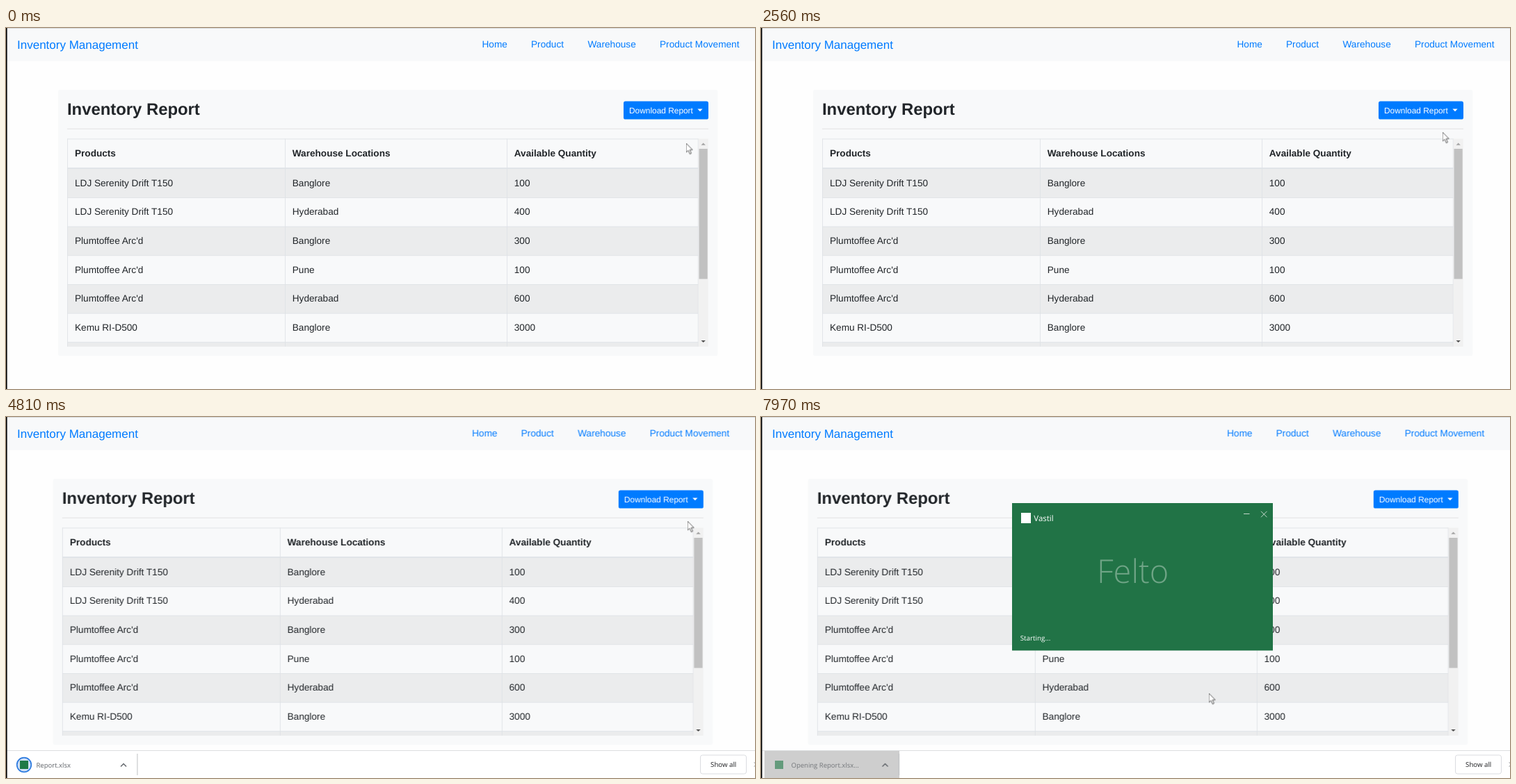
Animation of 1077 by 520 pixels, one loop 8 s. Source, as an HTML page:

```html
<!DOCTYPE html>
<html lang="en">
<head>
<meta charset="utf-8">
<title>Inventory Report</title>
<style>
html, body { margin: 0; width: 100%; height: 100%; overflow: hidden; background: #fefefe; }
svg { display: block; width: 1077px; height: 520px; }
text { font-family: "Liberation Sans", Arial, sans-serif; white-space: pre; text-rendering: geometricPrecision; }
.ui text { font-family: "Open Sans", "Noto Sans", sans-serif; }
.b { font-weight: 700; }
.semi { font-weight: 500; }
.thin { font-weight: 350; }
.e { text-anchor: end; }
.m { text-anchor: middle; }

/* one cycle is 8 s: 1% = 80 ms */
.a { animation: 8s linear infinite; }
.hard { animation-timing-function: step-end; }

#pointer { animation-name: pointer; animation-timing-function: ease-in-out; }
@keyframes pointer {
  0%, .4% { transform: translate(977.5px, 165.5px); }
  3%, 11.9% { transform: translate(924px, 115px); }
  18.4%, 29.9% { transform: translate(979px, 149px); }
  30%, 66.2% { transform: translate(979.5px, 149.5px); }
  76.5% { transform: translate(185px, 425px); animation-timing-function: ease-out; }
  80.8%, 90.4% { transform: translate(132px, 492.5px); }
  97%, 100% { transform: translate(643.5px, 397.5px); }
}
#arrow { animation-name: arrow; }
@keyframes arrow { 0% { opacity: 1; } 2% { opacity: 0; } 30% { opacity: 1; } }
#hand { animation-name: hand; }
@keyframes hand { 0% { opacity: 0; } 2% { opacity: 1; } 30% { opacity: 0; } }
#click { animation-name: click; }
@keyframes click {
  0%, 6.4% { opacity: 0; } 7.4% { opacity: .7; } 9.8%, 22.8% { opacity: 0; }
  23.1% { opacity: .6; } 24.2% { opacity: .7; } 28.2%, 85% { opacity: 0; }
  86.2% { opacity: .7; } 88.4%, 100% { opacity: 0; }
}

#btn { animation-name: btn; }
@keyframes btn { 0% { fill: #007bff; } 2% { fill: #0069d9; } 6.6% { fill: #0062cc; } 27% { fill: #007bff; } }
.open { animation-name: open; }
@keyframes open { 0% { opacity: 0; } 7.5% { opacity: 1; } 27% { opacity: 0; } }
#pick { animation-name: pick; }
@keyframes pick { 0% { opacity: 0; } 22.8% { opacity: 1; } 27% { opacity: 0; } }
#status { animation-name: status; }
@keyframes status { 0%, 20% { opacity: 0; } 21.2%, 30% { opacity: 1; } 32%, 100% { opacity: 0; } }

#dialog { animation-name: dialog; transform-origin: 531px 224px; }
@keyframes dialog {
  0%, 33.8% { opacity: 0; transform: scale(.95); }
  36.1% { opacity: .96; transform: none; }
  38.8%, 49.1% { opacity: 1; transform: none; }
  51.3% { opacity: .06; transform: scale(.958); }
  52.6%, 100% { opacity: 0; transform: scale(.95); }
}
#late { animation-name: late; }
@keyframes late { 0% { opacity: 0; } 37.5% { opacity: 1; } }
#caret { animation-name: caret; }
@keyframes caret { 0% { opacity: 0; } 42.6% { opacity: 1; } }

#links { animation-name: links; }
@keyframes links { 0% { transform: none; } 54.5% { transform: translateX(-14.4px); } }
#card { animation-name: card; }
@keyframes card { 0% { transform: none; } 54.5% { transform: translateX(-7.2px); } }

#shelf { animation-name: shelf; }
@keyframes shelf { 0%, 54% { transform: translateY(41px); } 59.2%, 100% { transform: none; } }
#edge { animation-name: edge; }
@keyframes edge { 0%, 62% { transform: none; } 64.8%, 100% { transform: translateX(9.5px); } }
#hover { animation-name: hover; }
@keyframes hover { 0%, 80.5% { opacity: 0; } 82%, 100% { opacity: 1; } }
#ripple { animation-name: ripple; transform-origin: 131.5px 493px; }
@keyframes ripple { 0%, 84.5% { transform: scale(0); } 86.25% { transform: scale(1); } 89%, 100% { transform: scale(2.8); } }
#done { animation-name: done; }
@keyframes done { 0% { opacity: 1; } 88.1% { opacity: 0; } }
#opening { animation-name: opening; }
@keyframes opening { 0% { opacity: 0; } 88.1% { opacity: 1; } }
#pulse { animation: pulse .5s ease-in-out infinite; }
@keyframes pulse { 0%, 100% { opacity: .45; } 60% { opacity: 1; } }
#splash { animation-name: splash; }
@keyframes splash { 0%, 95.4% { opacity: 0; } 97%, 100% { opacity: 1; } }
</style>
</head>
<body>
<svg id="stage" viewBox="0 0 1077 520"></svg>
<script>
const UI = 9.85, BODY = 13.6;
const rect = (x, y, w, h, fill, more = '') =>
  `<rect x="${x}" y="${y}" width="${w}" height="${h}" fill="${fill}" ${more}/>`;
// cy is the visual middle of the capitals
const text = (x, cy, str, size = BODY, fill = '#212529', cls = '') =>
  `<text x="${x}" y="${cy + size * .355}" font-size="${size}" fill="${fill}" class="${cls}">${str}</text>`;
const line = (d, stroke, w = 1) => `<path d="${d}" fill="none" stroke="${stroke}" stroke-width="${w}"/>`;
const fill = (d, color) => `<path d="${d}" fill="${color}"/>`;
const dot = (x, y, r, color) => `<circle cx="${x}" cy="${y}" r="${r}" fill="${color}"/>`;
const group = (id, body, cls = 'a') => `<g id="${id}" class="${cls}">${body}</g>`;
const caretDown = (x, y, r, color) => fill(`M${x - r} ${y - r / 2}h${2 * r}l${-r} ${r}z`, color);
const chevron = (x, y, r, dir, color, w = 1.2) =>
  line(`M${x - r} ${y - dir * r / 2}l${r} ${dir * r}l${r} ${-dir * r}`, color, w);
const sum = (list, fn) => list.map(fn).join('');

function navBar() {
  const links = [[684.5, 'Home'], [755, 'Product'], [836.5, 'Warehouse'], [940, 'Product Movement']];
  return rect(0, 0, 1077, 47.6, '#f8f9fa') +
    text(16, 23.9, 'Inventory Management', 17, '#007bff') +
    group('links', sum(links, ([x, s]) => text(x, 23.6, s, 13.65, '#007bff')), 'a hard');
}

function table() {
  const cols = [99, 411.8, 730.8], top = 202.8, step = 41.65;
  const glide = 'LDJ Serenity Drift T150', buds = "Plumtoffee Arc'd";
  const rows = [
    [glide, 'Banglore', 100], [glide, 'Hyderabad', 400],
    [buds, 'Banglore', 300], [buds, 'Pune', 100], [buds, 'Hyderabad', 600],
    ['Kemu RI-D500', 'Banglore', 3000], ['', '', '']
  ];
  let s = sum(['Products', 'Warehouse Locations', 'Available Quantity'],
    (h, i) => text(cols[i], 180.5, h, BODY, '#212529', 'b'));
  rows.forEach((row, i) => {
    const y = top + i * step;
    if (i % 2 === 0) s += rect(88, y, 907.5, step, '#ebeced');
    if (i) s += rect(88, y - .4, 907.5, .85, '#dee2e6');
    s += sum(row, (v, c) => text(cols[c], y + 20.2, v));
  });
  s += rect(88, 159.5, 907.5, .85, '#dee2e6') + rect(88, 201.2, 907.5, 1.7, '#dee2e6');
  s += sum([88, 401, 720.2, 994.8], x => rect(x, 159.5, .85, 300, '#dee2e6'));
  s += rect(995.7, 159.5, 14, 300, '#f1f1f1') + rect(996.5, 174, 12.2, 187.5, '#c1c1c1') +
    fill('M999.5 168.8h6.4l-3.2-3.3z', '#a3a3a3') + caretDown(1002.7, 451.5, 3.2, '#505050');
  return `<g clip-path="url(#tableClip)">${s}</g>`;
}

function card() {
  const menu = rect(888.5, 134.5, 135.3, 59, '#fff', 'rx="3" stroke="#c8c9ca" stroke-width=".9"') +
    text(909, 152.6, 'Felto') + text(909, 175.4, 'Pdf') +
    group('pick', rect(889, 141, 134.4, 23, '#007bff') + text(909, 152.6, 'Felto', BODY, '#fff'), 'a hard');
  return group('card',
    rect(74.8, 89, 948.6, 383.3, '#f8f9fa', 'rx="3.4"') +
    text(88, 116.7, 'Inventory Report', 23.85, '#212529', 'b') +
    rect(88, 144.8, 922, .9, '#dfe0e2') + table() +
    `<g class="a hard open">${rect(885.3, 102.9, 127.3, 31.4, '#92c4fc', 'rx="5"')}</g>` +
    rect(888, 105.6, 122, 26, '#007bff', 'id="btn" class="a hard" rx="2.7"') +
    text(896, 118.7, 'Download Report', 11.9, '#fff') + caretDown(998, 118.4, 3.6, '#fff') +
    `<g class="a hard open">${menu}</g>`, 'a hard');
}

function status() {
  return group('status', rect(2, 503, 109, 18, '#dcdee1', 'rx="2"') +
    text(6, 512.3, '127.0.0.1:5000/Report', 9.6, '#53575c'), 'a ui');
}

function shelf() {
  const icon = rect(20, 495, 12, 12, '#1f7a46');
  return group('shelf',
    rect(1.6, 480, 1076, 41, '#fff') + rect(1.6, 480, 1076, 1, '#dcdee0') +
    group('hover', rect(5, 481, 193, 39, '#f0f0f0')) +
    `<g clip-path="url(#chipClip)"><circle id="ripple" class="a" cx="131.5" cy="493" r="54.5" fill="#cecece"/></g>` +
    group('done',
      `<g id="pulse"><circle cx="26" cy="501" r="10.3" fill="#cfe0f6" stroke="#2d7be0" stroke-width="1.7"/></g>` +
      icon + text(43.5, 502, 'Report.xlsx', 9.5, '#5f6368'), 'a hard') +
    group('opening', `<g opacity=".6">${icon}</g>` +
      text(43.5, 502, 'Opening Report.xlsx...', 9.5, '#74777b'), 'a hard') +
    group('edge', chevron(169, 501.5, 4, -1, '#5f6368', 1.4) + rect(188.4, 485, 1, 31, '#bfc1c4')) +
    rect(998.5, 487, 66, 27, '#fff', 'rx="3" stroke="#dadce0"') +
    text(1031.7, 500.3, 'Show all', 9.7, '#202124', 'm semi') +
    line('M1076 497.5l6 6m-6 0l6-6', '#5f6368'), 'a ui');
}

const folder = (x, y) => fill(`M${x} ${y - 5}h4l1 1.5h4v9h-9z`, '#f0c44f') + rect(x + 2, y - 3, 7, 8, '#fbdd86');
const icons = {
  folder: y => folder(38, y),
  down: y => fill(`M40.5 ${y - 5}h4v5h3l-5 5.5l-5-5.5h3z`, '#3a84cf'),
  doc: y => rect(38, y - 5.5, 9, 11, '#fff', 'stroke="#8a97a5"') + rect(40, y - 1, 5, 4, '#6fa5d2'),
  pic: y => rect(37, y - 4.5, 12, 9, '#d9eaf7', 'stroke="#8795a3" stroke-width=".8"') +
    fill(`M38 ${y + 4}v-3l4-2l6 3v2z`, '#3f78a8'),
  cube: y => fill(`M37 ${y - 4}l7-1.5l5 2v7l-5 2l-7-2z`, '#29a3d8') + fill(`M40 ${y - 2}h5v5h-5z`, '#bfeaf8'),
  screen: y => rect(36.5, y - 4.5, 12.5, 9, '#1e8fe6', 'stroke="#1468ad" stroke-width=".8"'),
  page: y => rect(38, y - 6, 9, 12, '#fff', 'stroke="#9a9a9a"'),
  round: y => dot(36, y, 5, '#0f6cc9'),
  pc: y => fill(`M31 ${y - 5}l9 2v6l-9-1.5z`, '#3d95d6') + rect(33, y + 3, 10, 1.8, '#8796a3'),
  net: y => fill(`M31 ${y - 3}l10-2v7l-10 1z`, '#3d95d6') + dot(34, y + 2, 3.5, '#4a78a8')
};

function sidebar() {
  const items = [
    [33, 'Downloads', 'down', 1], [53.5, 'Documents', 'doc', 1], [74, 'Pictures', 'pic', 1],
    [94.5, 'Docs', 'folder'], [115, 'Inventory-Management', 'folder'], [135.5, 'Setup files', 'folder'],
    [156, 'src', 'folder'], [183.5, 'FogCrate', 'round'], [210.7, 'This PC', 'pc'],
    [231.2, '3D Objects', 'cube'], [251.7, 'Desktop', 'screen'], [272.2, 'Documents', 'doc'],
    [292.7, 'Downloads', 'down'], [313.2, 'Music', ''], [333.7, 'Pictures', 'pic'],
    [354.2, 'Videos', ''], [374.7, 'OS (C:)', 'page'], [402, 'Network', 'net']
  ];
  const outer = ['round', 'pc', 'net'];
  const rows = sum(items, ([y, name, icon, pin]) =>
    (icon ? icons[icon](y) : '') + text(outer.includes(icon) ? 45.3 : 52.4, y, name, UI, '#111') +
    (pin ? fill(`M119 ${y - 4}l5 4l-2 .5l-2 3l-1.5-1.5l-2.5 2.5l2-3.5l-1.5-1.5l3-1.5z`, '#8b9298') : ''));
  const late = line('M41 317v-8l5 2v2', '#2f8fdc', 1.4) + dot(40, 317, 2, '#2f8fdc') +
    rect(37, 349.5, 11, 9, '#4d5660') + rect(39, 351.5, 7, 5, '#9fc3dd');
  return `<g clip-path="url(#sideClip)">${rect(9, 241.5, 119, 20.5, '#d9d9d9')}${rows}${group('late', late, 'a hard')}</g>` +
    rect(127.5, 23, 14, 384, '#f0f0f0') + rect(127.5, 76, 14, 305, '#cdcdcd') +
    chevron(134.5, 31, 3.3, -1, '#444', 1.5) + chevron(134.5, 400, 3.3, 1, '#444', 1.5);
}

function fileList() {
  const heads = [[160, 'Name'], [411.5, 'Date modified'], [549.5, 'Type'], [665, 'Size']];
  const files = [['__pycache__', '21/08/2020 16:13'], ['static', '09/08/2020 00:38'],
    ['templates', '21/08/2020 20:44'], ['utils', '21/08/2020 17:32']];
  return sum(heads, ([x, s]) => text(x, 35, s, UI, '#50596a')) +
    sum([406, 544, 659.5, 736], x => rect(x, 23, 1, 23, '#e5e5e5')) +
    chevron(280.5, 24.5, 3.3, -1, '#777', 1) +
    sum(files, ([name, date], i) => {
      const y = 61 + i * 18.2;
      return folder(162.5, y - .5) + text(177.5, y, name, UI, '#111') +
        text(411.5, y, date, UI, '#6d6d6d') + text(549.5, y, 'File folder', UI, '#6d6d6d');
    });
}

function dialog() {
  const button = (x, s, stroke, w) =>
    rect(x, 483, 74, 20, '#e1e1e1', `stroke="${stroke}" stroke-width="${w}"`) + text(x + 37, 493.7, s, UI, '#111', 'm');
  return group('dialog',
    rect(8.5, -12, 1022, 527, '#fff', 'stroke="#8c8f92" filter="url(#shadow)"') +
    rect(9, 0, 1021.5, 22, '#f5f6f7') + rect(9, 22, 1021.5, .8, '#e8e9ea') +
    text(24.5, 8.5, 'Organize', UI, '#1e395b') + caretDown(71.5, 8, 2.6, '#333') +
    text(99.5, 8.5, 'New folder', UI, '#1e395b') +
    sum([3, 6, 9, 12], y => rect(954, y - .5, 3, 1.6, '#8a8f96') + rect(958, y - .5, 8, 1, '#8a8f96')) +
    caretDown(977, 8, 2.6, '#333') + dot(1010.5, 8, 6.2, '#0a64ad') + text(1010.5, 8, '?', 9.5, '#fff', 'm b') +
    sidebar() + fileList() +
    rect(9, 407, 1021.5, 107.5, '#f0f0f0') +
    text(111, 427.3, 'File name:', UI, '#111', 'e') + text(111, 448.3, 'Save as type:', UI, '#111', 'e') +
    rect(116, 417.5, 909.5, 18, '#fff', 'stroke="#0078d7"') +
    rect(119.5, 418.8, 31.5, 15, '#0078d7') + text(120, 427, 'Report', UI, '#fff') +
    group('caret', rect(150, 419, 1, 15, '#111'), 'a hard') +
    rect(116, 438.5, 909.5, 18, '#e1e1e1', 'stroke="#b4b4b4"') + text(118, 448.3, 'XLSX File', UI, '#111') +
    chevron(1018.3, 426.5, 3, 1, '#555', 1) + chevron(1018.3, 447.5, 3, 1, '#555', 1) +
    chevron(21, 495.5, 3.5, -1, '#333', 1.6) + text(30.3, 495.7, 'Hide Folders', UI, '#111') +
    button(856.5, 'Save', '#0078d7', 1.7) + button(941.5, 'Cancel', '#adadad', 1) +
    sum([0, 1, 2], i => sum([0, 1, 2].slice(2 - i), j => rect(1023 + j * 2.5, 507 + i * 2.5, 1.4, 1.4, '#b5b5b5'))),
    'a ui');
}

function splash() {
  return group('splash',
    rect(361, 124, 375, 212.4, '#217346') + rect(374, 138, 14, 15, '#fff') +
    text(392.3, 145.5, 'Vastil', 11.5, '#fff') +
    line('M694 139.5h8.5M719 135.8l8.5 8.5m0-8.5l-8.5 8.5', '#c3d8cb') +
    text(483, 222.3, 'Felto', 47, '#6fa486', 'thin') +
    text(372.7, 318.5, 'Starting...', UI, '#fff'), 'a ui');
}

function pointer() {
  const style = 'fill="#fff" stroke-linejoin="round"';
  return group('pointer',
    `<circle id="click" class="a" r="10" fill="#f2ec00"/>` +
    `<path id="arrow" class="a hard" ${style} stroke="#4a4a4a" stroke-width=".9" d="M.5.5V13.6L3.5 10.9L5.9 16L8 15L5.7 10H9.7z"/>` +
    `<path id="hand" class="a hard" ${style} stroke="#2b2b2b" d="M-1.5 10V1Q0-1 1.5 1V6Q3 5 4.2 6.3Q5.8 5.5 6.7 7Q8.6 6.5 8.7 8.5V12Q8.5 14.5 7 17.5H-.5Q-2 14.5-5 11.5Q-5.2 9-3 9.3z"/>`);
}

const clip = (id, x, y, w, h) => `<clipPath id="${id}">${rect(x, y, w, h, '#000')}</clipPath>`;
document.getElementById('stage').innerHTML =
  `<defs>${clip('tableClip', 87, 159, 924, 300)}${clip('sideClip', 9, 23, 118.5, 384)}${clip('chipClip', 5, 481, 193.5, 39)}
  <filter id="shadow" x="-5%" y="-5%" width="110%" height="110%"><feDropShadow dx="2" dy="2" stdDeviation="4" flood-opacity=".3"/></filter></defs>` +
  rect(0, 0, 1077, 520, '#fefefe') + navBar() + card() + status() + shelf() +
  rect(0, 0, 1077, .8, '#cfd1d3') + rect(0, 0, 1.6, 520, '#000') +
  dialog() + splash() + pointer();
</script>
</body>
</html>
```
